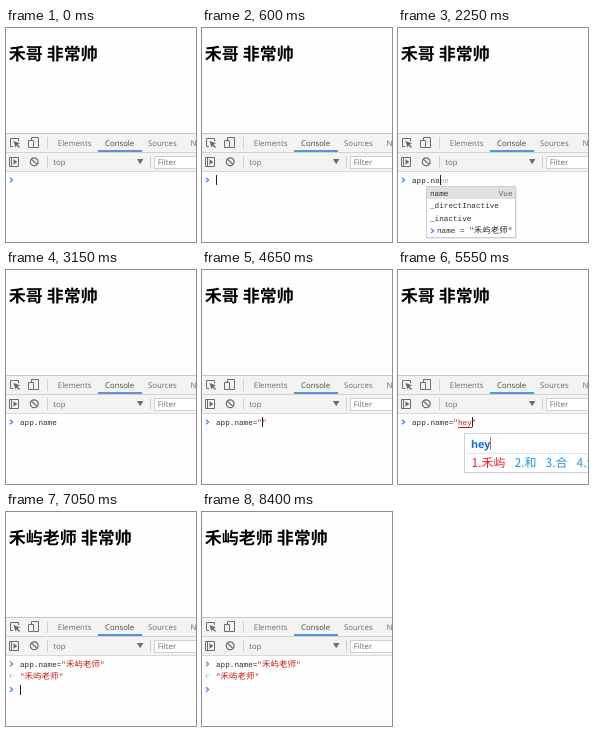
An HTML page that plays this animation: 190x214 px, repeating every 8850 ms.

```html
<!DOCTYPE html>
<html lang="zh-CN">
<head>
<meta charset="utf-8">
<title>Console demo</title>
<style>
  html, body { margin: 0; width: 100%; height: 100%; overflow: hidden; background: #fefefe; }
  svg { display: block; width: 190px; height: 214px; }
  text { white-space: pre; text-rendering: geometricPrecision; }
  .title { font: 700 17px "Noto Sans CJK SC", "Noto Sans CJK", sans-serif; fill: #000; }
  .ui { font: 7.8px "Open Sans", "Noto Sans", sans-serif; fill: #6a6a6a; }
  .ui .active { fill: #444; }
  .code { font: 7.66px "Liberation Mono", monospace; fill: #303030; }
  .han { font: 8.5px "Noto Sans CJK SC", "Noto Sans CJK", sans-serif; }
  .str { fill: #c8201c; }
  .ghost { fill: #a8a8a8; }
  .bold { font-weight: 700; }
  .type { fill: #666; text-anchor: end; }
  .pinyin { font: 700 10.8px "Open Sans", sans-serif; fill: #1a6fc9; }
  .pick { font: 300 12px "Noto Sans CJK SC", "Noto Sans CJK", sans-serif; fill: #2a92e2; }
  .pick.first { fill: #ea2028; }
  .line { fill: none; stroke: #6c6c6c; }
  .solid { fill: #6c6c6c; }
  rect { shape-rendering: crispEdges; }
</style>
</head>
<body>
<svg viewBox="0 0 190 214">
  <rect width="190" height="214" fill="#fefefe"/>
  <text class="title" id="title" x="2.8" y="32.4"></text>

  <rect y="105" width="190" height="39" fill="#f4f3f4"/>
  <rect y="105" width="190" height="1" fill="#c8c6c8"/>
  <rect y="124" width="190" height="1" fill="#d3d1d3"/>
  <rect y="143" width="190" height="1" fill="#dad8da"/>
  <rect x="92" y="122" width="44" height="2" fill="#5b92dc"/>

  <path class="line" d="M7 118.5H4.5V110.5H12.5V113"/>
  <path class="solid" d="M7.5 113L14 115.3L11.6 116.4L14 119L13 120L10.5 117.5L9.4 119.6Z"/>
  <path class="line" d="M25.5 112V109.5H32.5V119.5H28M22.5 112.5H27.5V119.5H22.5Z"/>
  <rect x="41" y="109" width="1" height="12" fill="#d0ced0"/>
  <g class="ui">
    <text x="51.8" y="117.8">Elements</text>
    <text class="active" x="99" y="117.8">Console</text>
    <text x="142" y="117.8">Sources</text>
    <text x="184.6" y="117.8">Network</text>
    <text x="47.3" y="136.6">top</text>
  </g>

  <path class="line" d="M3.5 129.5H12.5V138.5H3.5ZM5.5 129.5V138.5"/>
  <path class="solid" d="M7.5 131.3L11.3 134L7.5 136.7Z"/>
  <path class="line" stroke-width="1.2" d="M24.3 133.8a3.9 3.9 0 1 0 7.8 0a3.9 3.9 0 1 0 -7.8 0M25.5 131L31 136.6"/>
  <rect x="41" y="128" width="1" height="12" fill="#d0ced0"/>
  <path class="solid" d="M131 131H137.4L134.2 136.2Z"/>
  <rect x="144" y="128" width="1" height="12" fill="#d0ced0"/>
  <rect x="148.5" y="128.5" width="50" height="12" fill="#fff" stroke="#d2d0d4"/>
  <text class="ui" x="151.8" y="137">Filter</text>

  <g id="live"></g>
</svg>
<script>
const LOOP = 8850, LATIN = 4.597, HAN = 8.5, LEFT = 14;
const NAME = '禾屿老师', SHORT = '禾哥', TAIL = ' 非常帅';
const BLUE = '#4a88ee', GRAY = '#8a8a8a';

const globals = {
  x: 11, width: 140, pad: 2, type: 'Window', bold: true,
  rows: ['app', 'applicationCache', 'ApplicationCache', 'ApplicationCacheErrorEvent', 'createApplet']
};
const members = {
  x: 28, width: 90, pad: 4, type: 'Vue',
  rows: ['name', '_directInactive', '_inactive', `name = "${NAME}"`], recent: 3
};

const first = NAME.slice(0, 2);
const picks = {
  h: ['和', '好', '会', '后'], he: ['和', '喝', '合', '河'], hey: [first, '和', '合', '河'],
  l: ['了', '来', '里', '老'], la: ['拉', '啦', '辣', '蜡'], lao: ['老', '牢', '捞', '劳'],
  laos: ['老师', '老是', '老'], laoshi: ['老师', '老实', '老是']
};

// Each step: start in ms, then what changes from an empty prompt.
const on = true;
const value = (text, pinyin = '') => ({ expr: 'app.name=', text, pinyin, caret: on });
const steps = [
  [0, {}],
  [600, { caret: on }],
  [1050, {}],
  [1200, { expr: 'a', caret: on }],
  [1350, { expr: 'ap', caret: on }],
  [1500, { expr: 'app', caret: on }],
  [1650, { expr: 'app', caret: on, popup: globals }],
  [1950, { expr: 'app.', caret: on }],
  [2100, { expr: 'app.n', ghost: 'ame', caret: on, popup: members }],
  [2250, { expr: 'app.na', ghost: 'me', caret: on, popup: members }],
  [2400, { expr: 'app.nam', ghost: 'e', caret: on, popup: members }],
  [2550, { expr: 'app.name', caret: on, popup: members }],
  [2700, { expr: 'app.name', caret: on }],
  [3000, { expr: 'app.name' }],
  [3450, { expr: 'app.name', caret: on }],
  [3750, { expr: 'app.name' }],
  [4200, { expr: 'app.name', caret: on }],
  [4350, { expr: 'app.name=', caret: on }],
  [4500, value('')],
  [5250, value('', 'h')],
  [5400, value('', 'he')],
  [5550, value('', 'hey')],
  [5700, value(first)],
  [5850, value(first, 'l')],
  [6000, value(first, 'la')],
  [6150, value(first, 'lao')],
  [6300, value(first, 'laos')],
  [6450, value(first, 'laoshi')],
  [6600, value(NAME)],
  [7050, { done: true, caret: on }],
  [7500, { done: true }],
  [7950, { done: true, caret: on }],
  [8400, { done: true }]
];

const isHan = c => c > '\u2e80';
const widthOf = s => [...s].reduce((w, c) => w + (isHan(c) ? HAN : LATIN), 0);
const mark = s => s.replace(/[\u2e80-\u9fff]+/g, '<tspan class="han">$&</tspan>');
const span = (s, cls) => `<tspan class="${cls}">${mark(s)}</tspan>`;
const text = (x, y, body, cls = 'code', extra = '') =>
  `<text class="${cls}" x="${x}" y="${y}" ${extra}>${body}</text>`;
const rect = (x, y, w, h, fill, extra = '') =>
  `<rect x="${x}" y="${y}" width="${w}" height="${h}" fill="${fill}" ${extra}/>`;
const chevron = (x, y, color) =>
  `<path d="M${x} ${y - 2.3}l2.6 2.3l-2.6 2.3" fill="none" stroke="${color}" stroke-width="1.3"/>`;
const caretAt = (x, y) => rect(Math.round(x), y - 5, 1, 10, '#222');

function drawPopup({ x, width, pad, type, rows, bold, recent }) {
  const top = 159, rowH = 12.5, height = rows.length * rowH + 1;
  let out = rect(x + 1, top + 1, width, height, '#000', 'opacity=".08"') +
    rect(x + .5, top - .5, width - 1, height, '#fff', 'stroke="#cfccd2"') +
    rect(x + 1, top, width - 2, 12, '#e2dfe2');
  rows.forEach((row, i) => {
    const y = top + 8.6 + i * rowH, old = i === recent;
    if (old) out += chevron(x + pad + 1, y - 2.4, BLUE);
    out += text(x + pad + (old ? 7 : 0), y, mark(row), bold && !i ? 'code bold' : 'code');
  });
  return out + text(x + width - 3.5, top + 8.6, type, 'code type');
}

function drawIme(x, pinyin) {
  let out = rect(x + .5, 163.5, 140, 39, '#fff', 'stroke="#cdd0dc"') +
    rect(x + 2, 183, 140, 1, '#dde2ec') +
    text(x + 7, 177.6, pinyin, 'pinyin', 'id="pinyin"');
  let at = x + 7.5;
  picks[pinyin].forEach((word, i) => {
    out += text(at, 197, `${i + 1}.${word}`, i ? 'pick' : 'pick first');
    at += 19 + 12 * word.length;
  });
  return out;
}

function drawPrompt({ expr = '', text: str, pinyin = '', ghost = '', caret, popup }) {
  const quoted = str !== undefined;
  const before = expr + (quoted ? '"' + str : '');
  const start = LEFT + widthOf(before), end = start + widthOf(pinyin);
  const body = expr + (quoted ? span(`"${str}${pinyin}"`, 'str') : '') + span(ghost, 'ghost');
  let out = chevron(4, 152, BLUE) + text(LEFT, 154.6, body);
  if (pinyin) out += rect(start, 157, end - start, 1, '#c8201c');
  if (caret) out += caretAt(end, 152);
  if (popup) out += drawPopup(popup);
  if (pinyin) out += drawIme(Math.round(start + 6), pinyin);
  return out;
}

function drawResult({ caret }) {
  const str = span(`"${NAME}"`, 'str');
  return chevron(4, 152, GRAY) + text(LEFT, 154.6, 'app.name=' + str) +
    `<path d="M5.6 161.8l-2 2l2 2" fill="none" stroke="#aaa"/>` + rect(7, 163, 1, 1, '#aaa') +
    text(LEFT, 166.6, str) + chevron(4, 177.5, BLUE) + (caret ? caretAt(LEFT, 178) : '');
}

const title = document.getElementById('title');
const live = document.getElementById('live');
let shown;

function render(ms) {
  const step = steps.findLast(([start]) => start <= ms);
  if (step === shown) return;
  shown = step;
  const state = step[1];
  title.textContent = (state.done ? NAME : SHORT) + TAIL;
  live.innerHTML = state.done ? drawResult(state) : drawPrompt(state);
  const pinyin = document.getElementById('pinyin');
  if (pinyin) {
    const x = Number(pinyin.getAttribute('x')) + pinyin.getComputedTextLength();
    live.insertAdjacentHTML('beforeend', rect(Math.round(x), 167, 1, 13, '#b07078'));
  }
}

const origin = performance.now();
function tick() {
  render((performance.now() - origin) % LOOP);
  requestAnimationFrame(tick);
}
tick();
</script>
</body>
</html>
```
